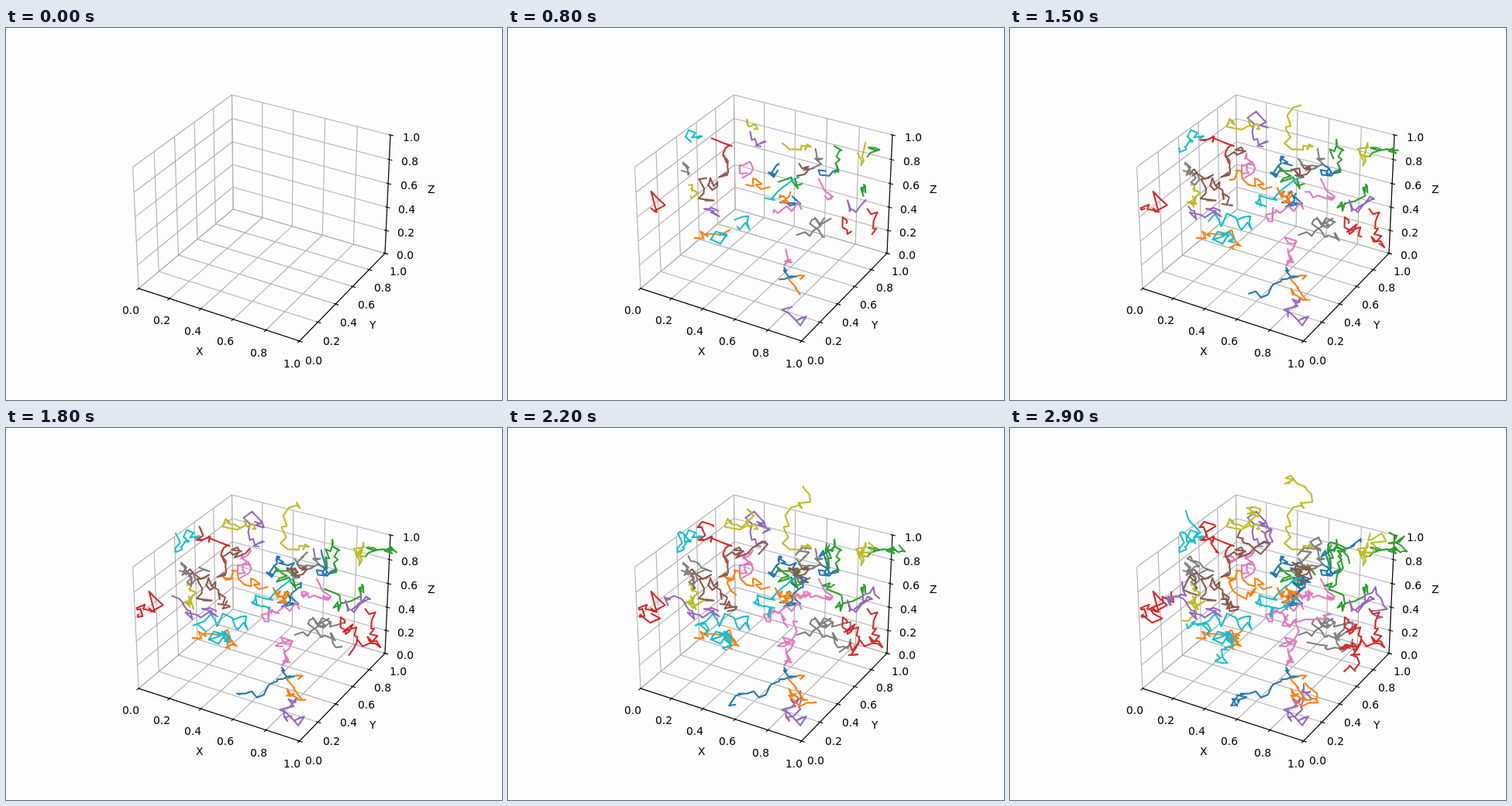
Write an HTML page with a canvas that moves like this. It is 640 px wide and 480 px high and loops after 3 s.

```html
<!DOCTYPE html>
<html lang="en">
<head>
<meta charset="utf-8">
<title>3D random walks</title>
<style>
html, body { margin: 0; width: 100%; height: 100%; overflow: hidden; background: #fdfdfd; }
canvas { display: block; }
</style>
</head>
<body>
<canvas id="stage" width="640" height="480"></canvas>
<script>
const ctx = document.getElementById('stage').getContext('2d');
const COLORS = ['#1f77b4', '#ff7f0e', '#2ca02c', '#d62728', '#9467bd',
                '#8c564b', '#e377c2', '#7f7f7f', '#bcbd22', '#17becf'];
const WALKS = 40, STEPS = 30, STEP_MS = 100, MAX_STEP = 0.05;
const PT = 100 / 72; // pixels per point

// Mersenne Twister, giving doubles in [0, 1)
function makeRandom(seed) {
  const mt = new Uint32Array(624);
  mt[0] = seed;
  for (let i = 1; i < 624; i++) {
    mt[i] = Math.imul(1812433253, mt[i - 1] ^ (mt[i - 1] >>> 30)) + i;
  }
  let i = 0;
  function next() {
    const j = (i + 1) % 624;
    let y = (mt[i] & 0x80000000) | (mt[j] & 0x7fffffff);
    mt[i] = mt[(i + 397) % 624] ^ (y >>> 1) ^ (y & 1 ? 0x9908b0df : 0);
    y = mt[i];
    i = j;
    y ^= y >>> 11;
    y ^= (y << 7) & 0x9d2c5680;
    y ^= (y << 15) & 0xefc60000;
    y ^= y >>> 18;
    return y >>> 0;
  }
  return () => {
    const high = next() >>> 5, low = next() >>> 6;
    return (high * 67108864 + low) / 9007199254740992;
  };
}

// Perspective view: elevation 30°, azimuth -60°, distance 10
const BOX = [25 / 21, 25 / 21, 25 / 28];
const C = Math.sqrt(3) / 2;
const RIGHT = [C, 0.5, 0], UP = [-0.25, C / 2, C], TOWARD = [C / 2, -0.75, 0.5];
const SCALE = 369.6 / 0.185;
const dot = (a, b) => a[0] * b[0] + a[1] * b[1] + a[2] * b[2];

function project(p) {
  const d = p.map((v, k) => (v - 0.5) * BOX[k]);
  const k = SCALE / (10 - dot(d, TOWARD));
  return [143.2 + 0.095 * SCALE + dot(d, RIGHT) * k,
          427.2 - 0.095 * SCALE - dot(d, UP) * k];
}

function polyline(points, color, width, cap) {
  ctx.beginPath();
  for (const [x, y] of points) ctx.lineTo(x, y);
  ctx.strokeStyle = color;
  ctx.lineWidth = width * PT;
  ctx.lineCap = cap;
  ctx.lineJoin = 'round';
  ctx.stroke();
}

// Text centred on x, aligned to whole pixels
function label(text, p, drop) {
  const [x, y] = project(p);
  const m = ctx.measureText(text);
  const left = m.actualBoundingBoxLeft;
  const width = left + m.actualBoundingBoxRight;
  ctx.fillText(text, Math.round(x - width / 2 - left) + left, Math.round(y + drop));
}

const line3d = (a, b, color, cap) => polyline([project(a), project(b)], color, 0.8, cap);

const TICKS = [0, 1, 2, 3, 4, 5].map(i => i / 5);

function drawGrid() {
  for (const t of TICKS) {
    for (const [a, b, c] of [
      [[t, 0, 0], [t, 1, 0], [t, 1, 1]],
      [[1, t, 0], [0, t, 0], [0, t, 1]],
      [[0, 0, t], [0, 1, t], [1, 1, t]]
    ]) {
      line3d(a, b, '#b0b0b0', 'butt');
      line3d(b, c, '#b0b0b0', 'butt');
    }
  }
}

// at(t, d): point at t along the axis, moved outward by d; tick(t, d): moved along the tick
const AXES = [
  { name: 'X', at: (t, d) => [t, -d, -d], tick: (t, d) => [t, -d, 0] },
  { name: 'Y', at: (t, d) => [1 + d, t, -d], tick: (t, d) => [1 + d, t, 0] },
  { name: 'Z', at: (t, d) => [1 + d, 1 + d, t], tick: (t, d) => [1 + d, 1, t] }
];
const PAD = 0.08 * 48 / (2 * 3.696 * 72); // outward shift per point

function drawAxes() {
  ctx.fillStyle = '#000';
  ctx.font = `${10 * PT}px "DejaVu Sans", sans-serif`;
  for (const { name, at, tick } of AXES) {
    line3d(at(0, 0), at(1, 0), '#000', 'square');
    label(name, at(0.5, 25 * PAD), 4);
    for (const t of TICKS) {
      line3d(tick(t, -0.008), tick(t, 0.016), '#000', 'square');
      label(t.toFixed(1), at(t, 11.5 * PAD), 11);
    }
  }
}

const random = makeRandom(19680801);

function makeWalk() {
  const pos = [random(), random(), random()];
  return Array.from({ length: STEPS }, () => {
    for (let k = 0; k < 3; k++) pos[k] += (2 * random() - 1) * MAX_STEP;
    return project(pos);
  });
}
const walks = Array.from({ length: WALKS }, makeWalk);

function draw() {
  const count = Math.floor(performance.now() / STEP_MS) % STEPS;
  ctx.fillStyle = '#fdfdfd';
  ctx.fillRect(0, 0, 640, 480);
  drawGrid();
  drawAxes();
  if (count > 1) {
    ctx.save();
    ctx.beginPath();
    ctx.rect(143, 58, 370, 369);
    ctx.clip();
    walks.forEach((walk, i) => polyline(walk.slice(0, count), COLORS[i % 10], 1.5, 'square'));
    ctx.restore();
  }
  requestAnimationFrame(draw);
}
draw();
</script>
</body>
</html>
```
